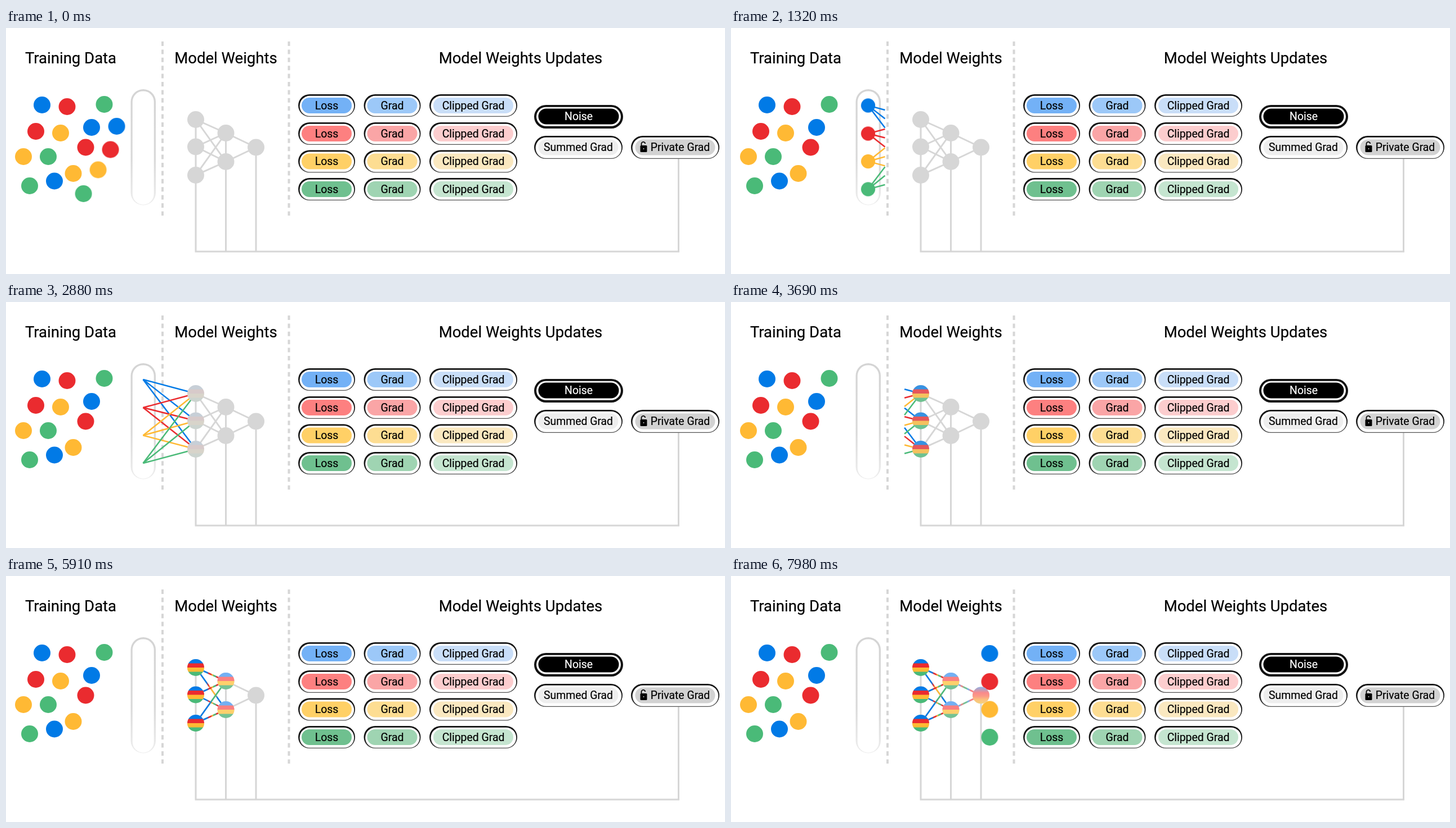
Recreate the animation shown at these times as an HTML page. Size 1277x438 px, loop 8 s.

```html
<!DOCTYPE html>
<html lang="en">
<head>
<meta charset="utf-8">
<title>Private training</title>
<style>
  html, body { margin: 0; width: 100%; height: 100%; overflow: hidden; background: #fff; }
  svg { display: block; width: 1277px; height: 438px; }
  text { font: 400 19.4px Roboto, sans-serif; text-anchor: middle; fill: #000; stroke: #000; stroke-width: .2; }
  .title { font-size: 27.5px; }
  .light { fill: #fff; stroke: #fff; }
  .wire { fill: none; stroke: #d6d6d6; stroke-width: 3; }
  .move, .shrink, .ray, .link, .fade, .exit { animation: 8s linear infinite; }
  .move { animation-name: move; }
  .shrink { animation-name: shrink; }
  .ray, .link { stroke-width: 2.5; stroke-dasharray: 1 3; }
  .ray { animation-name: ray; }
  .near { animation-name: near; }
  .cross { animation-name: cross; }
  .last { animation-name: last; }
  .fade1 { animation-name: fade1; }
  .fade2 { animation-name: fade2; }
  .fade3 { animation-name: fade3; }
  .exit { animation-name: exit; }

  @keyframes move { 0% { transform: translate(var(--x), var(--y)); } 12.5%, 100% { transform: translate(243.5px, var(--row)); } }
  @keyframes shrink { 0%, 14.1% { transform: scale(1); } 29.25%, 100% { transform: scale(0); } }
  @keyframes ray {
    0%, 12.5% { stroke-dashoffset: 1; }
    25%, 37.5% { stroke-dashoffset: 0; }
    50%, 100% { stroke-dashoffset: -1; }
  }
  @keyframes near { 0%, 50% { stroke-dashoffset: 1; } 62.5%, 100% { stroke-dashoffset: 0; } }
  @keyframes cross { 0%, 51% { stroke-dashoffset: 1; } 67.5%, 100% { stroke-dashoffset: 0; } }
  @keyframes last { 0%, 72.5% { stroke-dashoffset: 1; } 82%, 100% { stroke-dashoffset: 0; } }
  @keyframes fade1 { 0%, 35% { opacity: 0; } 50%, 100% { opacity: 1; } }
  @keyframes fade2 { 0%, 59.4% { opacity: 0; } 70.6%, 100% { opacity: 1; } }
  @keyframes fade3 { 0%, 80% { opacity: 0; } 87.5%, 100% { opacity: 1; } }
  @keyframes exit {
    0%, 92.9% { transform: translate(444px, 212px); opacity: 0; }
    93% { transform: translate(444px, 212px); opacity: 1; }
    99.75%, 100% { transform: translate(459.5px, var(--row)); opacity: 1; }
  }
</style>
</head>
<body>
<svg id="stage" xmlns="http://www.w3.org/2000/svg" width="1277" height="438"></svg>
<script>
const colors = ['#017ae6', '#ea2b2f', '#ffb934', '#4aba78'];
const soft = ['#73b0f4', '#fb8080', '#fdd06c', '#74c294'];
const rows = [138, 188, 237.5, 287];
const inputs = [[337, 163], [337, 211.5], [337, 262]];
const hidden = [[390.5, 187], [390.5, 238]];
const output = [444, 212.5];

// Resting samples per colour, and the ones that get drawn into the batch
const resting = [
  [[64, 137], [152, 177], [86, 272.5]],
  [[108.5, 140], [53, 184], [141.5, 212.5]],
  [[97, 187], [31, 229], [119.5, 259]],
  [[174.5, 136], [75, 229], [42, 281]]
];
const batch = [[196.5, 175], [185.5, 216.5], [163.5, 252.5], [137.5, 295]];

const columns = [
  ['Loss', 519, 101, ['#73b1f6', '#fd8080', '#ffd066', '#6fc08f']],
  ['Grad', 635.5, 101, ['#9cc8f8', '#faa5a6', '#fddd92', '#9fd4b2']],
  ['Clipped Grad', 752, 156, ['#c9def8', '#fccdce', '#fae8c0', '#c5e5d0']]
];

const line = (a, b, attrs) =>
  `<line x1="${a[0]}" y1="${a[1]}" x2="${b[0]}" y2="${b[1]}" ${attrs}/>`;
const dot = ([x, y], fill, attrs = '') =>
  `<circle cx="${x}" cy="${y}" r="15" fill="${fill}" ${attrs}/>`;
const rect = (x, y, w, h, fill) =>
  `<rect x="${x}" y="${y}" width="${w}" height="${h}" rx="${Math.min(w, h) / 2}" fill="${fill}"/>`;
const label = (s, x, y, attrs = '') => `<text x="${x}" y="${y}" ${attrs}>${s}</text>`;
const gradient = (id, stops, dir = 'x2="1" y2="0"') =>
  `<linearGradient id="${id}" x1="0" y1="0" ${dir}>` +
  stops.map(([at, c]) => `<stop offset="${at}" stop-color="${c}"/>`).join('') +
  '</linearGradient>';
const bands = list => list.flatMap((c, i) => [[i / 4 + 0.015, c], [(i + 1) / 4 - 0.015, c]]);
const down = 'x2="0" y2="1"';

// Outline is heavier at the top left and fades towards the bottom
function pill(text, x, cy, w, fill, inset = 6, h = 40, textX = x + w / 2) {
  return rect(x, cy - h / 2, w, h, 'url(#rim)') +
    rect(x + 2.6, cy - h / 2 + 2.8, w - 4.4, h - 4, '#fff') +
    rect(x + inset, cy - 14, w - 2 * inset, 28, fill) +
    label(text, textX, cy + 6.5);
}

const [blue, red, yellow, green] = colors;
const defs = '<defs>' +
  gradient('full', bands(colors), down) +
  gradient('pale', bands(soft), down) +
  gradient('blend', [[0, '#93b0e4'], [0.15, '#b9a0c0'], [0.35, '#fa8a8a'], [0.55, '#fb9a86'], [0.75, '#fbc07c'], [1, '#f5d27c']], down) +
  gradient('short', [[0.38, blue], [0.44, red], [0.5, red], [0.55, yellow], [0.6, green], [0.65, green], [0.7, red]]) +
  gradient('fall', [[0.36, blue], [0.42, red], [0.47, yellow], [0.64, yellow], [0.72, blue]]) +
  gradient('rise', [[0.45, blue], [0.56, green], [1, green]]) +
  gradient('thin', [[0.28, soft[0]], [0.36, soft[1]], [0.44, soft[3]], [0.52, soft[3]], [0.58, soft[0]], [0.66, soft[1]]]) +
  gradient('tube', [[0, '#d4d4d4'], [0.6, '#d9d9d9'], [1, '#eeeeee']], down) +
  gradient('rim', [[0, '#111'], [0.6, '#1a1a1a'], [1, '#555']], down) +
  '</defs>';

const out = [defs];

out.push(label('Training Data', 115, 63, 'class="title"'),
  label('Model Weights', 390.5, 63, 'class="title"'),
  label('Model Weights Updates', 914, 63, 'class="title"'));
for (const x of [278, 502.5])
  out.push(line([x, 24], [x, 334], 'stroke="#d6d6d6" stroke-width="4" stroke-dasharray="8 6.4"'));

out.push(rect(221.5, 109, 44.5, 206.5, 'url(#tube)'), rect(224.7, 112.4, 38, 202, '#fff'));
resting.forEach((list, i) => list.forEach(p => out.push(dot(p, colors[i]))));

// Grey network and feedback wires
const pairs = [];
inputs.forEach(a => hidden.forEach((b, j) => pairs.push([a, b, j])));
pairs.forEach(([a, b]) => out.push(line(a, b, 'class="wire"')));
hidden.forEach(a => out.push(line(a, output, 'class="wire"')));
out.push('<path class="wire" d="M337 163V398H1194.5V232M390.5 187V398M444 212V398"/>');

// Rays from the batch to the first layer
rows.forEach((y, i) => inputs.forEach(p =>
  out.push(line([243.5, y], p, `class="ray" pathLength="1" stroke="${colors[i]}"`))));
batch.forEach(([x, y], i) => out.push(
  `<g class="move" style="--x:${x}px;--y:${y}px;--row:${rows[i]}px">${dot([0, 0], colors[i], 'class="shrink"')}</g>`));

// Coloured links
pairs.forEach(([a, b, j]) => {
  const far = Math.abs(b[1] - a[1]) > 50;
  const paint = !far ? 'short' : j ? 'fall' : 'rise';
  out.push(line(a, b, `class="link ${far ? 'cross' : 'near'}" pathLength="1" stroke="url(#${paint})"`));
});
hidden.forEach(a => out.push(line(a, output, 'class="link last" pathLength="1" stroke="url(#thin)"')));

rows.forEach((y, i) => out.push(dot([0, 0], colors[i], `class="exit" style="--row:${y}px"`)));

[[inputs, 'full'], [hidden, 'pale'], [[output], 'blend']].forEach(([layer, paint], i) =>
  layer.forEach(p => out.push(dot(p, '#d6d6d6'), dot(p, `url(#${paint})`, `class="fade fade${i + 1}"`))));

// Update pills
columns.forEach(([text, x, w, fills]) =>
  rows.forEach((y, i) => out.push(pill(text, x, y, w, fills[i], w > 120 ? 7 : 6))));
out.push(rect(938, 137, 158, 42, '#111'), rect(942, 140.8, 150, 34, '#fff'), rect(945.5, 143.5, 143, 28, '#000'),
  label('Noise', 1017, 163.5, 'class="light"'),
  pill('Summed Grad', 938, 212.5, 157, '#eeeeee', 7.5, 41),
  pill('Private Grad', 1110, 212.5, 157, '#d2d2d2', 7.5, 41, 1197.5),
  '<rect x="1126.5" y="209" width="12" height="12" rx="1.5"/>',
  '<path d="M1128.5 209V206.5a3.4 3.4 0 0 1 6.8 -0.6" fill="none" stroke="#000" stroke-width="1.8"/>',
  '<circle cx="1132.5" cy="215" r="1" fill="#d2d2d2"/>');

document.getElementById('stage').innerHTML = out.join('');
</script>
</body>
</html>
```
